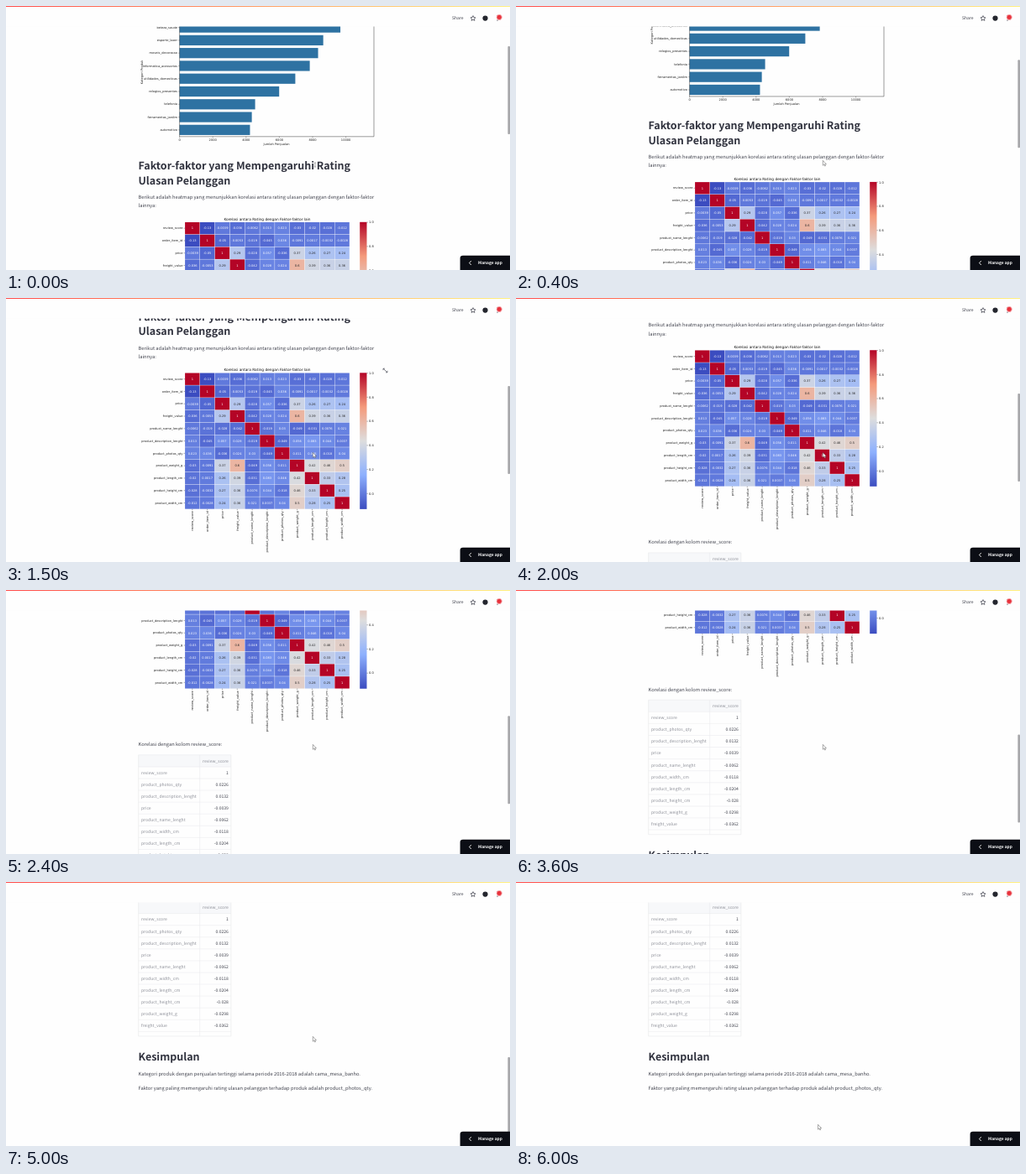
An HTML page for the animation above (6.1 s loop, 600 px wide and 315 px high).

```html
<!DOCTYPE html>
<html lang="id">
<head>
<meta charset="utf-8">
<title>Dashboard scroll</title>
<style>
  html, body { margin: 0; height: 100%; overflow: hidden; background: #fefefe; }
  svg { display: block; width: 600px; height: 315px; text-rendering: geometricPrecision; }
  text { font: 5.775px "Noto Sans CJK JP", "Noto Sans CJK SC", "Noto Sans CJK", "Noto Sans", sans-serif; fill: #41434e; white-space: pre; }
  .h { font-size: 12.5px; font-weight: 700; fill: #31333f; }
  .cell { font-size: 5.02px; }
  .dim { font-size: 5.02px; fill: #8e9099; }
  .app { font-size: 4.85px; font-weight: 700; fill: #fff; }
  .plot { font: 3.62px "DejaVu Sans", sans-serif; fill: #222; }
  .title { font: 4.32px "DejaVu Sans", sans-serif; fill: #111; }
  .end { text-anchor: end; }
  .mid { text-anchor: middle; }
</style>
</head>
<body>
<svg viewBox="0 0 600 315">
  <defs>
    <linearGradient id="strip"><stop stop-color="#ff4b4b"/><stop offset="1" stop-color="#fff080"/></linearGradient>
    <linearGradient id="warm" x1="0" y1="1" x2="0" y2="0"></linearGradient>
  </defs>
  <g id="page"></g>
  <path id="expand" d="M449 86.2V84.2H451M449 84.2L454 88.8M454 86.8V88.8H452" fill="none" stroke="#50525c" stroke-width=".7"/>
  <rect width="600" height="24.5" fill="#fefefe"/>
  <rect width="600" height="1" fill="url(#strip)"/>
  <text class="cell" x="531" y="16.2">Share</text>
  <path d="M556 11.6L556.9 13.6L559 13.8L557.4 15.3L557.9 17.4L556 16.3L554.1 17.4L554.6 15.3L553 13.8L555.1 13.6Z" fill="none" stroke="#31333f" stroke-width=".7"/>
  <circle cx="570.5" cy="14.6" r="3.1" fill="#24262e"/>
  <path d="M585 11.5v.1M585 14.3v.1M585 17v.1" stroke="#31333f" stroke-width="1.2" stroke-linecap="round"/>
  <circle cx="587.2" cy="13.4" r="3.1" fill="#e8323c" stroke="#f7b9bb" stroke-width=".8"/>
  <rect id="thumb" x="597.4" width="2.6" height="105" rx="1" fill="#a6a6a9"/>
  <path d="M600 297.7H544Q540.6 297.7 540.6 301V315H600Z" fill="#0c0e15"/>
  <path d="M553.8 304.2L551.5 306.6L553.8 309" fill="none" stroke="#fff" stroke-width=".9"/>
  <text class="app" x="562" y="308.4">Manage app</text>
  <path id="beam" d="M366.8 187h2.2M367.9 187v5M366.8 192h2.2" stroke="#555" stroke-width=".5"/>
  <path id="arrow" d="M0 0V5.8L1.4 4.6L2.3 6.6L3.2 6.2L2.3 4.3H4.1Z" fill="#fff" stroke="#555" stroke-width=".5"/>
</svg>
<script>
const $ = id => document.getElementById(id);
const out = [];
const text = (x, y, str, cls = '', extra = '') =>
  out.push(`<text x="${x}" y="${y}" class="${cls}" ${extra}>${str}</text>`);
const rect = (x, y, w, h, fill) =>
  out.push(`<rect x="${x}" y="${y}" width="${w}" height="${h}" fill="${fill}"/>`);
const path = (d, color, width) =>
  out.push(`<path d="${d}" fill="none" stroke="${color}" stroke-width="${width}"/>`);
const turned = (x, y, str, cls) => text(x, y, str, cls, `transform="rotate(-90 ${x} ${y})"`);
const clamp = (v, max = 1) => Math.max(0, Math.min(max, v));

// Each feature: correlation with the review score, and how strongly it follows parcel bulk
const features = Object.entries({
  review_score: [1, 0], order_item_id: [-.13, 0], price: [-.0039, .45], freight_value: [-.0362, .7],
  product_name_lenght: [-.0062, 0], product_description_lenght: [.0132, .08],
  product_photos_qty: [.0226, 0], product_weight_g: [-.0298, .85], product_length_cm: [-.0204, .55],
  product_height_cm: [-.028, .52], product_width_cm: [-.0118, .55]
}).map(([name, [score, bulk]]) => ({ name, score, bulk }));

function barChart() {
  const left = 206.6, bottom = 155.8, perSale = .0198;
  const bars = { beleza_saude: 9670, esporte_lazer: 8640, moveis_decoracao: 8330,
    informatica_acessorios: 7830, utilidades_domesticas: 6960, relogios_presentes: 5990,
    telefonia: 4545, ferramentas_jardim: 4345, automotivo: 4235 };
  Object.entries(bars).forEach(([name, sold], i) => {
    const y = 25.6 + 15.28 * i;
    rect(left, y - 6.1, sold * perSale, 12.2, '#2e72a2');
    path(`M${left - 1.3} ${y}H${left}`, '#222', .4);
    text(204, y + 1.2, name, 'plot end');
  });
  for (let v = 0; v <= 10000; v += 2000) {
    const x = left + v * perSale;
    path(`M${x} ${bottom}v1.3`, '#222', .4);
    text(x, 161, v, 'plot mid');
  }
  path(`M${left} 0V${bottom}H438V0`, '#222', .45);
  text(322, 165.6, 'Jumlah Penjualan', 'plot mid');
  turned(162.8, 79, 'Kategori Produk', 'plot mid');
}

// Diverging blue to red colour map
const stops = [[59, 76, 192], [141, 176, 254], [221, 221, 221], [244, 154, 123], [180, 4, 38]];
function shade(v) {
  const t = clamp((v + .13) / 1.13) * 4, i = Math.min(3, Math.floor(t));
  return stops[i].map((c, k) => Math.round(c + (stops[i + 1][k] - c) * (t - i)));
}
const isLight = ([r, g, b]) => .299 * r + .587 * g + .114 * b > 171;

let seed = 11;
const random = () => (seed = seed * 16807 % 2147483647) / 2147483647;
function correlation(a, b) {
  if (a === b) return 1;
  if (a === features[0]) return a === b ? 1 : b.score;
  return a.bulk * b.bulk + (random() - .5) * .1;
}

function heatmap() {
  const left = 212.9, top = 257.8, w = 17.83, h = 14.78, bottom = top + 11 * h;
  const cell = (r, c, v) => {
    const rgb = shade(v), x = left + c * w, y = top + r * h;
    rect(x + .2, y + .2, w - .4, h - .4, `rgb(${rgb})`);
    text(x + w / 2, y + h / 2 + 1.3, +v.toPrecision(2), 'plot mid',
      `style="fill:${isLight(rgb) ? '#262626' : '#fff'}"`);
  };
  text(311, 255.9, 'Korelasi antara Rating dengan Faktor-faktor lain', 'title mid');
  features.forEach((f, r) => {
    const y = top + h * (r + .5), x = left + w * (r + .5);
    features.slice(r).forEach((other, k) => {
      const v = correlation(f, other);
      cell(r, r + k, v);
      if (k) cell(r + k, r, v);
    });
    path(`M${left - 1.3} ${y}h1.3M${x} ${bottom}v1.3`, '#222', .4);
    text(210.4, y + 1.2, f.name, 'plot end');
    turned(x + 1.2, 422.8, f.name, 'plot end');
  });
  $('warm').innerHTML = stops.map((c, i) => `<stop offset="${i / 4}" stop-color="rgb(${c})"/>`).join('');
  rect(421.2, top, 8.3, 11 * h, 'url(#warm)');
  for (let i = 0; i <= 5; i++) {
    const y = top + .3 + 28.75 * (5 - i);
    path(`M429.5 ${y}h1.3`, '#222', .4);
    text(432, y + 1.3, (i / 5).toFixed(1), 'plot');
  }
}

function table() {
  const rows = [...features].sort((a, b) => b.score - a.score).slice(0, 10);
  const top = 499.5, h = 14.08, line = '#e6e7ea';
  rect(157.7, top, 110.2, h, '#f7f8fa');
  text(264.8, top + 8.9, 'review_score', 'dim end');
  rows.forEach(({ name, score }, i) => {
    const y = top + h * (i + 1);
    path(`M157.7 ${y}h110.2`, line, .5);
    text(161, y + 8.9, name, 'dim');
    text(264.8, y + 8.9, score, 'cell end');
  });
  path(`M157.7 ${top + 11 * h}h110.2M230.7 ${top}V660`, line, .5);
  path(`M157.7 ${top}h110.2V660h-110.2Z`, line, .6);
}

barChart();
text(157.5, 195, 'Faktor-faktor yang Mempengaruhi Rating', 'h');
text(157.5, 212.6, 'Ulasan Pelanggan', 'h');
text(157.5, 230, 'Berikut adalah heatmap yang menunjukkan korelasi antara rating ulasan pelanggan dengan faktor-faktor');
text(157.5, 240.3, 'lainnya:');
heatmap();
text(157.5, 489, 'Korelasi dengan kolom review_score:');
table();
text(157.5, 688.9, 'Kesimpulan', 'h');
text(157.5, 707.1, 'Kategori produk dengan penjualan tertinggi selama periode 2016-2018 adalah cama_mesa_banho.');
text(157.5, 723.7, 'Faktor yang paling memengaruhi rating ulasan pelanggan terhadap produk adalah product_photos_qty.');
$('page').innerHTML = out.join('');

// [start, end, distance] of each scroll gesture
const scrolls = [[150, 800, 124], [800, 1150, 44.5], [1900, 2400, 134], [2400, 2850, 65.5], [3600, 4000, 108]];
const progress = (t, start, end) => clamp((t - start) / (end - start));

function draw() {
  const t = performance.now() % 6100;
  const scroll = scrolls.reduce((sum, [start, end, d]) => sum + d * progress(t, start, end), 0);
  const show = (id, on) => { $(id).style.opacity = +on; };
  const overText = scroll < 25;
  $('page').setAttribute('transform', `translate(0 ${-scroll})`);
  $('thumb').setAttribute('y', 48 + scroll * .338);
  show('thumb', 1 - progress(t, 5050, 5350));
  show('expand', t > 1200 && t < 1950);
  show('beam', overText);
  show('arrow', !overText);
  const p = progress(t, 5000, 5700), ease = p * p * (3 - 2 * p);
  $('arrow').setAttribute('transform', `translate(${365.3 - 5.8 * ease} ${184.4 + 105 * ease})`);
  requestAnimationFrame(draw);
}
draw();
</script>
</body>
</html>
```
